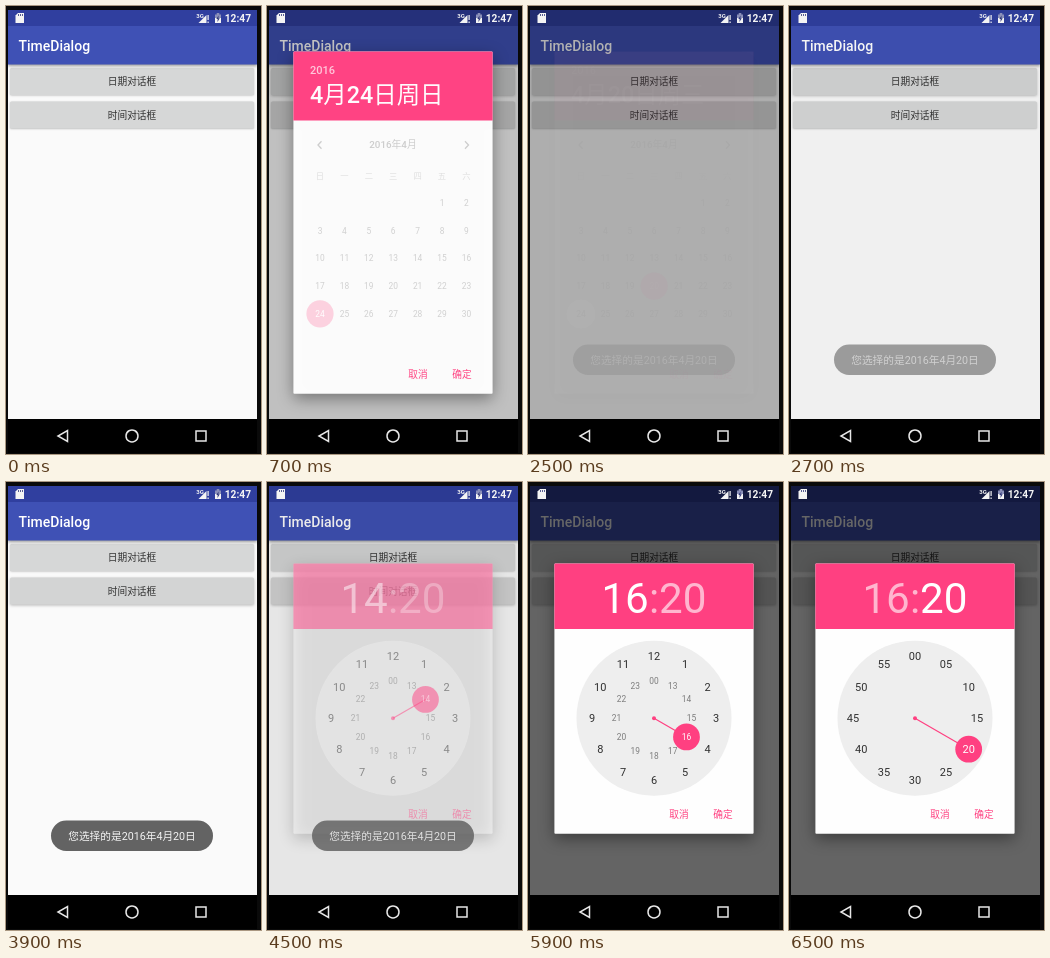
Recreate the animation shown at these times as an HTML page with a canvas. Size 255x448 px, loop 8000 ms.

```html
<!DOCTYPE html>
<html lang="zh">
<head>
<meta charset="utf-8">
<title>TimeDialog</title>
<style>
  html, body { margin: 0; width: 100%; height: 100%; overflow: hidden; background: #0a0a0a; }
  canvas { display: block; width: 255px; height: 448px; }
</style>
</head>
<body>
<canvas></canvas>
<script>
const W = 255, H = 448, LOOP = 8000, STEP = 100;
const PINK = '#ff4081', INK = '#303030', FADED = 'rgba(255,255,255,.62)', ICON = '#f4f4f4';
const FONT = 'Roboto, "Noto Sans CJK SC", "Noto Sans CJK", sans-serif';
const MID = 126;
const canvas = document.querySelector('canvas');
const ctx = canvas.getContext('2d');
const dpr = window.devicePixelRatio || 1;
canvas.width = W * dpr;
canvas.height = H * dpr;
ctx.scale(dpr, dpr);

const ramp = (t, from, to) => Math.min(1, Math.max(0, (t - from) / (to - from)));
const decay = (t, from, to) => (1 - ramp(t, from, to)) ** 3;
const pad = n => String(n).padStart(2, '0');

function rect(x, y, w, h, color, radius = 0) {
  ctx.fillStyle = color;
  ctx.beginPath();
  ctx.roundRect(x, y, w, h, radius);
  ctx.fill();
}

function disc(x, y, r, color) {
  ctx.fillStyle = color;
  ctx.beginPath();
  ctx.arc(x, y, r, 0, Math.PI * 2);
  ctx.fill();
}

function stroke(color, width, path) {
  ctx.strokeStyle = color;
  ctx.lineWidth = width;
  ctx.stroke(new Path2D(path));
}

function fill(color, path) {
  ctx.fillStyle = color;
  ctx.fill(new Path2D(path));
}

function text(str, x, baseline, size, color, align = 'center', weight = 400) {
  ctx.font = `${weight} ${size}px ${FONT}`;
  ctx.textAlign = align;
  ctx.fillStyle = color;
  ctx.fillText(str, x, baseline);
}

function faded(alpha, draw) {
  if (alpha <= 0) return;
  ctx.save();
  ctx.globalAlpha *= alpha;
  draw();
  ctx.restore();
}

function shadowed(blur, dy, opacity, draw) {
  ctx.save();
  ctx.shadowColor = `rgba(0,0,0,${opacity})`;
  ctx.shadowBlur = blur * dpr;
  ctx.shadowOffsetY = dy * dpr;
  draw();
  ctx.restore();
}

function button(label, y, pressed) {
  shadowed(pressed ? 3 : 2, pressed ? 1 : .5, .25, () =>
    rect(4, y, 244, 27, pressed ? '#d3d4d4' : '#d6d7d7', 1.5));
  text(label, MID, y + 17.1, 9.7, INK);
}

function activity(t) {
  rect(2, 4, 249, 410, '#fafafa');
  button('日期对话框', 62, t >= 500 && t < 2900);
  button('时间对话框', 95.5, t >= 3900);
  shadowed(3, 1, .4, () => rect(2, 20, 249, 38.5, '#3f51b5'));
  rect(2, 4, 249, 16, '#303f9f');
  text('TimeDialog', 12.5, 45, 14, '#fff', 'left', 500);
}

function systemBars() {
  fill(ICON, 'M12 7h6v10h-8.5v-7.5z');
  for (let x = 12; x <= 16; x += 2) rect(x, 8, .8, 2, '#30387a');
  text('3G', 194, 12, 6, ICON, 'center', 700);
  fill(ICON, 'M200.5 9v8h-8z');
  rect(201.5, 9, 1.2, 5, ICON);
  rect(201.5, 15.5, 1.2, 1.5, ICON);
  rect(210.7, 7, 2.6, 2, '#8a8fb8');
  rect(209, 8.5, 6, 4, '#8a8fb8');
  rect(209, 12, 6, 5, ICON);
  fill('#30387a', 'M212.6 9.5l-2.3 3.5h1.4l-.3 3 2.4-3.8h-1.4z');
  text('12:47', 245, 16, 10.2, ICON, 'right', 700);

  rect(2, 413, 249, 34, '#000');
  stroke('#e6e6e6', 1.5, 'M61.5 424.5v11l-9.5-5.5zM190 425h10v10h-10zM132 430a6 6 0 1 1 0-.1z');
}

function dialogFrame(top, bottom, headerBottom) {
  const left = 26.4, width = 199.2;
  shadowed(16, 5, .4, () => rect(left, top, width, bottom - top, '#fefefe', 1));
  rect(left, top, width, headerBottom - top, PINK, [1, 1, 0, 0]);
  text('取消', 151, bottom - 15.5, 9.7, PINK);
  text('确定', 195, bottom - 15.5, 9.7, PINK);
}

function calendar(selected, appear) {
  const colX = col => 53 + col * 24.4;
  faded(appear, () => {
    text('2016年4月', MID, 142.3, 9.8, INK, 'center', 500);
    stroke(INK, 1.3, 'M54.5 135.3l-3.5 3.7 3.5 3.7M198 135.3l3.5 3.7-3.5 3.7');
    [...'日一二三四五六'].forEach((day, col) => text(day, colX(col), 173.3, 8.3, '#8a8a8a'));
    if (selected !== 24) disc(colX(0), 308, 14.5, '#f5f5f5');
  });
  for (let day = 1; day <= 30; day++) {
    const cell = day + 4, isSelected = day === selected;
    const x = colX(cell % 7), y = 197 + Math.floor(cell / 7) * 27.7;
    if (isSelected) faded(appear, () => disc(x, y, 13.6, PINK));
    faded(isSelected ? 1 : appear, () => text(day, x, y + 3, 8.4, isSelected ? '#fff' : '#404040'));
  }
}

function dateDialog(t) {
  const selected = t < 1500 ? 24 : 20;
  dialogFrame(45.4, 387.7, 114.6);
  text('2016', 43, 68, 11, 'rgba(255,255,255,.72)', 'left', 500);
  text(`4月${selected}日周${selected === 24 ? '日' : '三'}`, 43, 96.5, 23.4, '#fff', 'left', 500);
  calendar(selected, ramp(t, 640, 900));
}

const DIAL_Y = 236.2, OUTER = 62, INNER = 37.5;

function dialPoint(index, radius) {
  const angle = index * Math.PI / 6;
  return [MID + radius * Math.sin(angle), DIAL_Y - radius * Math.cos(angle)];
}

function hand(index, radius) {
  const [x, y] = dialPoint(index, radius);
  stroke(PINK, 1.2, `M${MID} ${DIAL_Y}L${x} ${y}`);
  disc(MID, DIAL_Y, 2, PINK);
  disc(x, y, 13.4, PINK);
}

function dialLabels(radius, size, color, selected, label) {
  for (let i = 0; i < 12; i++) {
    const [x, y] = dialPoint(i, radius);
    text(label(i), x, y + size * .36, size, i === selected ? '#fff' : color);
  }
}

function timeDialog(t) {
  const hour = t < 5900 ? 14 : 16, minuteMode = t >= 6000;
  dialogFrame(81.4, 351.7, 147);
  text(hour, 120.8, 131, 42.2, minuteMode ? FADED : '#fff', 'right');
  text(':', MID, 131, 42.2, FADED);
  text('20', 131, 131, 42.2, minuteMode ? '#fff' : FADED, 'left');

  disc(MID, DIAL_Y, 77.5, '#eeeeee');
  const minutes = ramp(t, 5900, 6500);
  faded(1 - minutes, () => {
    hand(hour - 12, INNER);
    dialLabels(OUTER, 11, INK, -1, i => i || 12);
    dialLabels(INNER, 8.4, '#7c7c7c', hour - 12, i => i ? i + 12 : '00');
  });
  faded(minutes, () => {
    hand(4, OUTER);
    dialLabels(OUTER, 11, INK, 4, i => pad(i * 5));
  });
}

function toast() {
  rect(45, 338.5, 162, 30.5, '#636363', 15.25);
  text('您选择的是2016年4月20日', MID, 357.8, 10.7, ICON);
}

function draw(t) {
  rect(0, 0, W, H, '#0a0a0a');
  activity(t);
  const dim = .6 * (ramp(t, 575, 900) * decay(t, 2400, 2900) + ramp(t, 4470, 4700));
  rect(2, 4, 249, 410, `rgba(0,0,0,${dim})`);
  faded(ramp(t, 600, 702) * decay(t, 2400, 2550), () => dateDialog(t));
  faded(ramp(t, 4400, 4600), () => timeDialog(t));
  faded(ramp(t, 2400, 2900) * (1 - ramp(t, 4400, 4700) ** 1.7), toast);
  systemBars();
}

const start = performance.now();
function frame() {
  const t = (performance.now() - start) % LOOP;
  draw(Math.floor(t / STEP) * STEP);
  requestAnimationFrame(frame);
}
frame();
</script>
</body>
</html>
```
